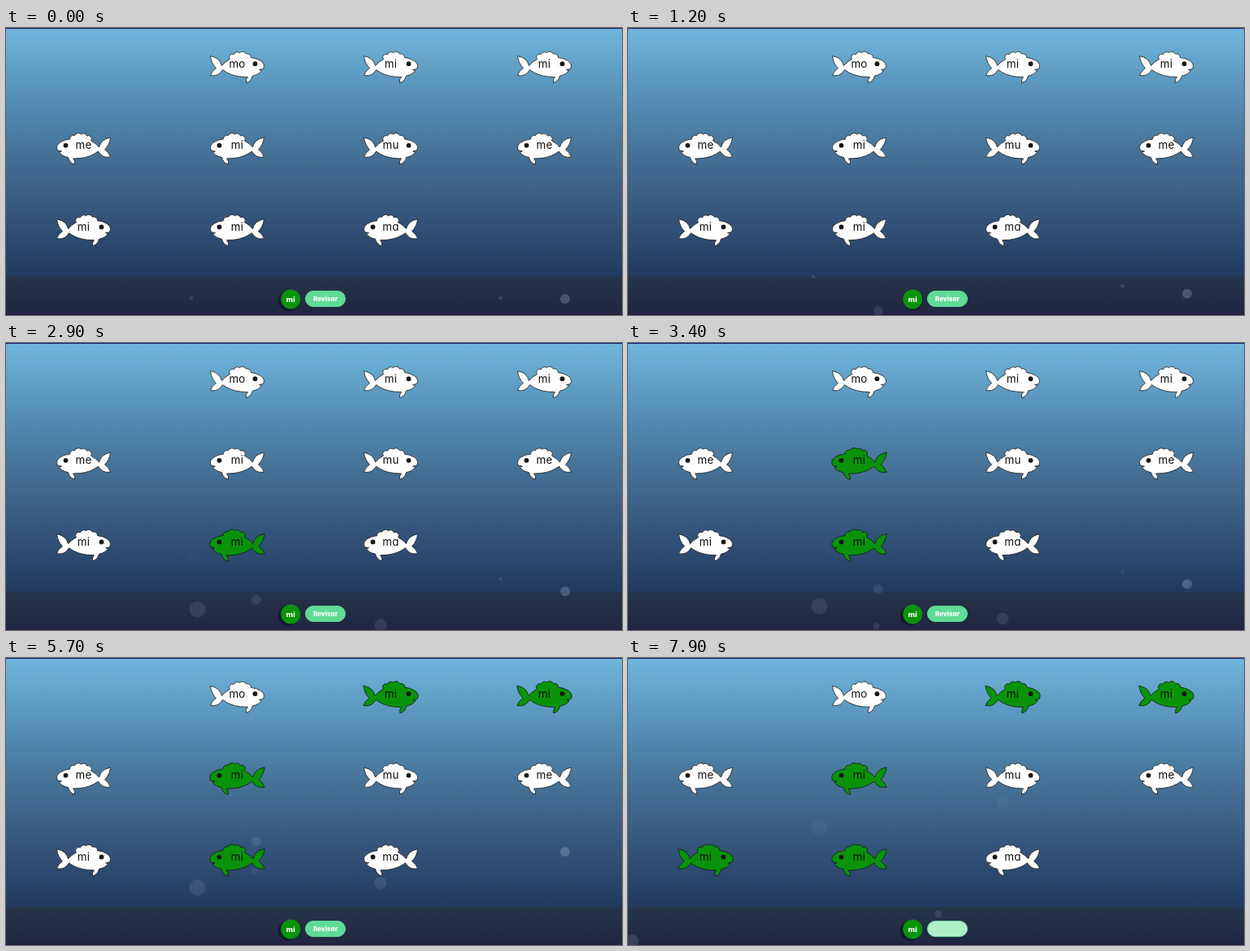
Write an HTML page that moves like this. It is 758 px wide and 354 px high and loops after 8000 ms.

```html
<!DOCTYPE html>
<html lang="es">
<head>
<meta charset="utf-8">
<style>
  html, body { margin: 0; width: 100%; height: 100%; overflow: hidden; background: #202840; }
  svg { display: block; width: 758px; height: 354px; }
  text { font-family: Inter, "Open Sans", sans-serif; font-feature-settings: "cv11"; text-anchor: middle; }
  .fish path { stroke: #171717; stroke-width: .8; stroke-linejoin: round; }
  .fish text { font-size: 13.4px; fill: #111; letter-spacing: .2px; }
  .label { font-weight: 800; fill: #fff; }
</style>
</head>
<body>
<svg id="stage" viewBox="0 0 758 354">
  <defs>
    <linearGradient id="water" x2="0" y2="1">
      <stop offset="0" stop-color="#70b6dc"/>
      <stop offset=".33" stop-color="#5188af"/>
      <stop offset=".5" stop-color="#467297"/>
      <stop offset=".66" stop-color="#3c5f86"/>
      <stop offset="1" stop-color="#213a5f"/>
    </linearGradient>
    <linearGradient id="floor" x2="0" y2="1">
      <stop offset="0" stop-color="#263349"/>
      <stop offset="1" stop-color="#202740"/>
    </linearGradient>
  </defs>
  <rect width="758" height="307" fill="url(#water)"/>
  <rect y="307" width="758" height="47" fill="url(#floor)"/>
  <rect width="758" height="1" fill="#1c2070"/>
  <rect y="352" width="758" height="2" fill="#261e42"/>
  <g id="bubbles" fill="#d5e4ff"></g>
  <g id="school"></g>
  <circle id="shadow" r="12.5" fill="#131a33"/>
  <circle cx="350.3" cy="334.5" r="12" fill="#0a930a"/>
  <text class="label" x="350.3" y="338" font-size="9">mi</text>
  <rect id="button" x="368.5" y="324.5" width="49" height="19" rx="9.5"/>
  <text id="check" class="label" x="393" y="337" font-size="8">Revisar</text>
</svg>
<script>
const $ = id => document.getElementById(id);

function add(parent, tag, attrs = {}) {
  const el = document.createElementNS('http://www.w3.org/2000/svg', tag);
  for (const key in attrs) el.setAttribute(key, attrs[key]);
  parent.appendChild(el);
  return el;
}

// tail, belly, fin, mouth, head, then the scalloped back
const BODY = 'M-19-2Q-20-6-23-9.500Q-27-13-33-14Q-32-5-26 1Q-31 4-33 10Q-23 12-18 3' +
  'Q-9 10 4 11.500L13 12Q10 15 11 19Q17 18 19 10.500Q27 9 30 4L27 3L32 2' +
  'Q35-4 29-8Q24-11.500 17-12A4.500 4.500 0 0 0 11-16.500A5 5 0 0 0 3-18' +
  'A4.500 4.500 0 0 0-4-16A4 4 0 0 0-9-10Q-15-7-19-2Z';

// column, row, facing, syllable, time picked (s)
const fish = [
  [1, 0, 1, 'mo'], [2, 0, 1, 'mi', 4.3], [3, 0, 1, 'mi', 5.6],
  [0, 1, -1, 'me'], [1, 1, -1, 'mi', 3.4], [2, 1, 1, 'mu'], [3, 1, -1, 'me'],
  [0, 2, 1, 'mi', 7.3], [1, 2, -1, 'mi', 2.8], [2, 2, -1, 'ma']
].map(([col, row, facing, word, picked = Infinity]) => {
  const g = add($('school'), 'g', {
    class: 'fish', transform: `translate(${95.5 + 189 * col} ${48.5 + 100.6 * row})`
  });
  const body = add(g, 'path', { d: BODY });
  add(g, 'circle', { cx: 22 * facing, cy: -4.3, r: 2.9, fill: '#171717' });
  add(g, 'text', { y: .1 }).textContent = word;
  return { body, facing, picked };
});

// x, radius, reference time, y at that time, speed, half acceleration, birth, end, opacity
const bubbles = [
  [688, 6, 0, 334, 2.2, 2.54, -1, 8.4, .22],
  [308, 6, 1.2, 349, 14.2, 2.9, -1, 8, .1],
  [235.5, 10, 2.3, 331, 2.1, 3.5, 2, 9, .11],
  [461, 7.5, 2.3, 355, 9.3, 3.97, 1.9, 9, .11],
  [228, 2.3, 0, 333, 20.2, 1.25, -1, 3.6, .12],
  [608.5, 2.3, 0, 333, 11.2, 1.1, -1, 5, .12],
  [305.5, 4, 3.4, 349, 33, 2, 3, 7, .11],
  [382, 4.5, 7.9, 316, 30, 3, 7, 10, .14],
  [5, 8, 7.9, 349, 12, 3, 6.9, 12, .14]
].map(([cx, r, ref, y, speed, accel, birth, end, alpha]) => ({
  el: add($('bubbles'), 'circle', { cx, r }), ref, y, speed, accel, birth, end, alpha
}));

const clamp = v => Math.max(0, Math.min(1, v));

function draw(t) {
  for (const b of bubbles) {
    const s = t - b.ref;
    b.el.setAttribute('cy', b.y - b.speed * s - b.accel * s * s);
    b.el.setAttribute('opacity', b.alpha * clamp((t - b.birth) / .3) * clamp((b.end - t) / 2.5));
  }
  for (const f of fish) {
    const on = t >= f.picked, size = on ? 1.02 : 1;
    f.body.setAttribute('fill', on ? '#0a930a' : '#fff');
    f.body.setAttribute('transform', `scale(${f.facing * size} ${size})`);
  }
  const pressed = t >= .9 && t < 1.5;
  $('shadow').setAttribute('cx', pressed ? 351 : 347.5);
  $('shadow').setAttribute('cy', pressed ? 335.5 : 336.5);
  const checked = t >= 7.9;
  $('button').setAttribute('fill', checked ? '#aeefca' : '#5fdb96');
  $('button').setAttribute('stroke', checked ? '#7cd9a5' : '#5fdb96');
  $('check').setAttribute('opacity', checked ? 0 : 1);
}

const start = performance.now();
(function tick() {
  draw((performance.now() - start) % 8000 / 1000);
  requestAnimationFrame(tick);
})();
</script>
</body>
</html>
```
